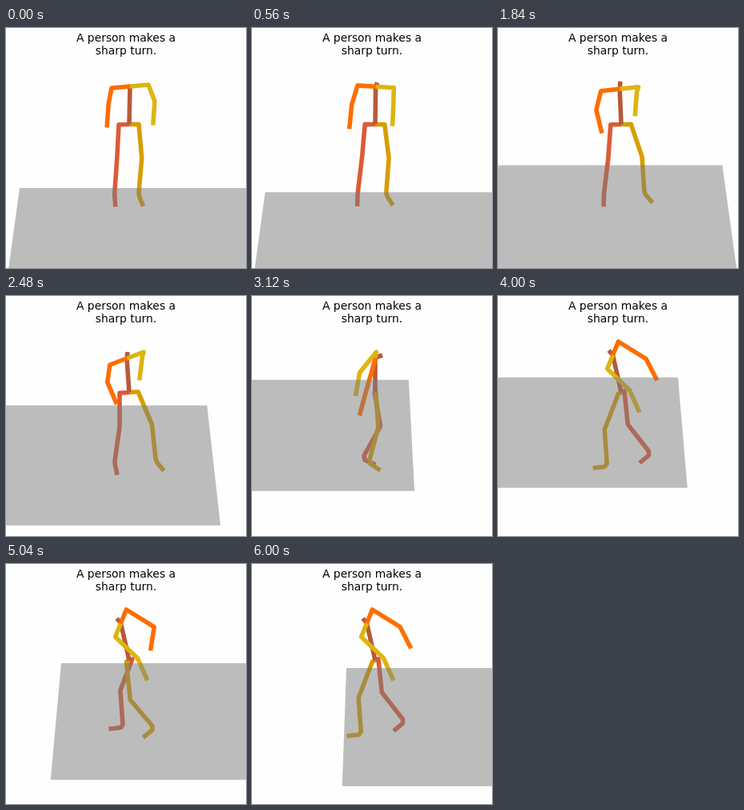
An HTML page for the animation above (6.08 s loop, 300x300 px).

```html
<!DOCTYPE html>
<html lang="en">
<head>
<meta charset="utf-8">
<title>Walking figure</title>
<style>
  html, body { margin: 0; width: 100%; height: 100%; overflow: hidden; background: #fefefe; }
  svg { display: block; width: 100vw; height: 100vh; }
  text { font: 13.89px "DejaVu Sans", sans-serif; text-anchor: middle; fill: #000; }
  polyline { fill: none; stroke-width: 5.56; stroke-linejoin: round; }
</style>
</head>
<body>
<svg viewBox="0 0 300 300">
  <text x="150" y="17">A person makes a</text>
  <text x="150" y="33">sharp turn.</text>
  <g id="figure"></g>
  <polygon id="floor" fill="#7d7d7d" fill-opacity=".5"/>
</svg>
<script>
const LOOP = 6080, STEP = 80, WALK_START = 4000, STRIDE = 1000;
const ROOT = [154, 120.5];

// Angles are in degrees from straight down, positive towards the right.
// turn: 1 faces the viewer, 0 is sideways. tilt: how far the left shoulder hangs below the neck.
// arm: upper length, upper angle, forearm angle. leg: thigh, shin and foot angle.
const stand = {
  turn: 1, tilt: -2, neck: [155, 73], head: [2, 0],
  rightArm: [20, -11, -4], leftArm: [22, 21, -4],
  rightLeg: [-3, -4, 3], leftLeg: [5, -5, 17]
};
const shift = {
  turn: .97, tilt: 3, neck: [154, 74], head: [2, -9],
  rightArm: [29, -20, -4], leftArm: [14, -18, -2],
  rightLeg: [-6, -9, -5], leftLeg: [10, -3, 34]
};
const step = {
  turn: .92, tilt: -8, neck: [151, 78], head: [1, -8],
  rightArm: [22, -8, 23], leftArm: [6, -17, -7],
  rightLeg: [0, -8, 9], leftLeg: [23, 6, 34]
};
const pivot = {
  turn: .06, tilt: -7, neck: [154, 77], head: [9, -3],
  rightArm: [38, -16, -15], leftArm: [33, -39, -10],
  rightLeg: [10, -29, 52], leftLeg: [4, -15, 47]
};

const values = pose => Object.values(pose).flat();
const mix = (a, b, u) => a.map((v, i) => v + (b[i] - v) * u);

// The legs trade places every stride; the one moving forward bends its knee.
function walk(t) {
  const phase = Math.PI * (t - WALK_START) / STRIDE;
  const leg = p => {
    const [thigh, shin, foot] = mix([-21, 4, -72], [6, 38, -38], (1 + Math.cos(p)) / 2);
    return [thigh, shin + 20 * Math.max(0, Math.sin(p)), foot];
  };
  return {
    turn: -.3, tilt: 17, neck: [143.5, 74], head: [-5, -6],
    rightArm: [41, 58, 9 + 18 * Math.cos(phase)], leftArm: [39, 46, 24],
    rightLeg: leg(phase), leftLeg: leg(phase + Math.PI)
  };
}

const poses = [
  [0, ...values(stand)], [1120, ...values(shift)], [2480, ...values(step)],
  [3120, ...values(pivot)], [WALK_START, ...values(walk(WALK_START))]
];
// Time, then left end and height of the floor's far edge
const floorPath = [
  [0, 17, 200], [1120, 13, 202.5], [2480, -18, 136.7], [3120, -64, 104.8],
  [3400, -71, 100], [4000, -34, 101.8], [5040, 69, 124], [6000, 118, 130]
];

// Smooth curve through unevenly spaced keys
function sample(keys, t) {
  const last = keys.length - 1;
  const time = Math.min(t, keys[last][0]);
  let i = 0;
  while (i < last - 1 && time >= keys[i + 1][0]) i++;
  const span = keys[i + 1][0] - keys[i][0], u = (time - keys[i][0]) / span;
  const slope = (k, c) => {
    const a = keys[Math.max(k - 1, 0)], b = keys[Math.min(k + 1, last)];
    return (b[c] - a[c]) / (b[0] - a[0]) * span;
  };
  return keys[i].map((p, c) => {
    const q = keys[i + 1][c], m = slope(i, c), n = slope(i + 1, c);
    return p + u * (m + u * (3 * (q - p) - 2 * m - n + u * (2 * (p - q) + m + n)));
  }).slice(1);
}

function bone([x, y], length, degrees) {
  const a = degrees * Math.PI / 180;
  return [x + length * Math.sin(a), y + length * Math.cos(a)];
}
function arm(neck, shoulder, [length, upper, fore]) {
  const elbow = bone(shoulder, length, upper);
  return [neck, shoulder, elbow, bone(elbow, 30, fore)];
}
function leg(hip, length, [thigh, shin, foot]) {
  const knee = bone(hip, length, thigh);
  const ankle = bone(knee, 42.5, shin);
  const heel = bone(ankle, 5, (shin + foot) / 2);
  return [ROOT, hip, knee, ankle, heel, bone(ankle, 18.5, foot)];
}

function skeleton(v) {
  const [turn, tilt, ...rest] = v;
  const neck = rest.slice(0, 2), head = rest.slice(2, 4);
  const limb = n => rest.slice(4 + 3 * n, 7 + 3 * n);
  const offset = ([x, y], dx, dy) => [x + dx * turn, y + dy * tilt];
  return [
    leg(offset(ROOT, -13, -.1), 42, limb(2)),
    leg(offset(ROOT, 12, .1), 42 + .35 * Math.abs(tilt), limb(3)),
    [ROOT, mix(neck, ROOT, .72), mix(neck, ROOT, .17), neck,
      [neck[0] + head[0], neck[1] + head[1]]],
    arm(neck, offset(neck, -23, -1), limb(0)),
    arm(neck, offset(neck, 23, 1), limb(1))
  ];
}

const figure = document.getElementById("figure");
const floor = document.getElementById("floor");
const lines = ["#dd5a37", "#d69e00", "#b75a39", "#ff6d00", "#ddb50e"].map(color => {
  const line = document.createElementNS("http://www.w3.org/2000/svg", "polyline");
  line.setAttribute("stroke", color);
  figure.append(line);
  return line;
});
const place = (shape, points) =>
  shape.setAttribute("points", points.flat().map(v => v.toFixed(2)).join(" "));

function drawFloor(t) {
  const horizon = -770;
  const [left, top] = sample(floorPath, t);
  const right = left + .297 * (top - horizon);
  const bottom = top + 139 + (top - 105) * .35;
  const spread = (bottom - horizon) / (top - horizon);
  const near = x => 150 + (x - 150) * spread;
  place(floor, [left, top, right, top, near(right), bottom, near(left), bottom]);
}

function draw(t) {
  const pose = t < WALK_START ? sample(poses, t) : values(walk(t));
  skeleton(pose).forEach((points, i) => place(lines[i], points));
  drawFloor(t);
}

const start = performance.now();
function tick() {
  const t = (performance.now() - start) % LOOP;
  draw(Math.floor(t / STEP) * STEP);
  requestAnimationFrame(tick);
}
tick();
</script>
</body>
</html>
```
